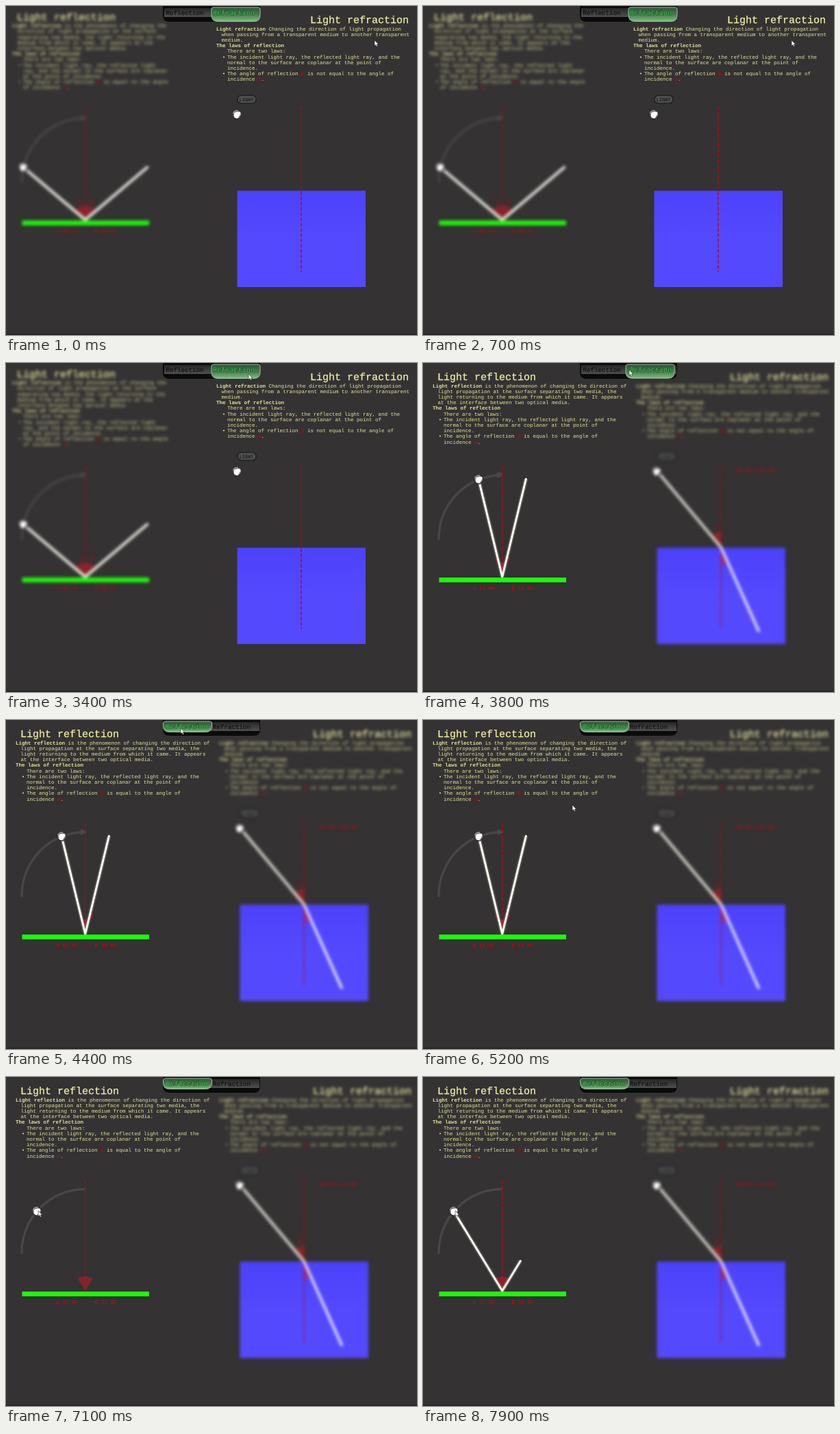
Animation, 600 px wide and 480 px high, one loop 8000 ms. Source, as an HTML page:

```html
<!DOCTYPE html>
<html lang="en">
<head>
<meta charset="utf-8">
<title>Light reflection and refraction</title>
<style>
html, body { margin: 0; width: 100%; height: 100%; overflow: hidden; background: #343233; }
svg { display: block; width: 600px; height: 480px; }
text { font: 7.5px "Liberation Mono", "Courier New", monospace; fill: #e4e49c; white-space: pre; text-rendering: geometricPrecision; }
.title { font-size: 15px; fill: #eeeea2; stroke: #eeeea2; stroke-width: .3; }
.b { font-weight: bold; }
.r { fill: #b00814; font-weight: bold; }
.num { fill: #b80a16; font-weight: bold; }
.beam { fill: none; stroke: #fffff4; stroke-width: 3; stroke-linejoin: round; stroke-linecap: square; }
.halo { fill: none; stroke: #fffff0; stroke-opacity: .16; stroke-width: 6.5; }
.normal { stroke: #b00a18; stroke-width: 1.4; stroke-dasharray: 5.5 2.2; }
.wedge { fill: #d01822; fill-opacity: .5; }
.tab { font-size: 9.2px; fill: #121212; stroke: #121212; stroke-width: .2; }
.tab.on { font-size: 10.2px; font-weight: bold; fill: #3fae50; stroke: #0d3012; stroke-width: .7; paint-order: stroke; }
.blur { filter: blur(2.1px); }
</style>
</head>
<body>
<svg viewBox="0 0 600 480">
  <defs>
    <linearGradient id="green" x2="0" y2="1">
      <stop offset="0" stop-color="#2f5534"/><stop offset=".5" stop-color="#457a4c"/><stop offset="1" stop-color="#7ebd82"/>
    </linearGradient>
    <linearGradient id="grey" x2="0" y2="1">
      <stop offset="0" stop-color="#262626"/><stop offset="1" stop-color="#505050"/>
    </linearGradient>
    <linearGradient id="water" x2="0" y2="1">
      <stop offset="0" stop-color="#4c42fa"/><stop offset=".5" stop-color="#5549fe"/>
    </linearGradient>
    <g id="bulb">
      <circle r="7" fill="#444" stroke="#2a2a2a"/>
      <path d="M-5.5 -1Q-4 -6 2 -5.5" fill="none" stroke="#9a9a9a" stroke-width="1.5"/>
      <path d="M-4 -2Q0 -5 4.5 -3.5Q7 -1 4 1.5Q3 6 0 6Q-6 5 -4 -2Z" fill="#fff"/>
      <path d="M1.5 6L6 0" stroke="#999" stroke-width="1.2"/>
    </g>
  </defs>
  <rect width="600" height="480" fill="#343233"/>
  <rect y="478" width="600" height="2" fill="#2a2529"/>

  <g id="left">
    <g id="wideText"></g>
    <g id="narrowText" transform="translate(-5 -4.3)"></g>
    <path d="M23 258A92.5 92.5 0 0 1 115.5 163.5" fill="none" stroke="#484747" stroke-width="3.4"/>
    <circle id="knob" r="4.2" fill="#484747"/>
    <path id="tip" d="M109 159L118 163.5L109 168Z" fill="#4b4a4a"/>
    <path class="normal" d="M115.8 150V312"/>
    <path id="wedge" class="wedge"/>
    <text id="symA" class="num" x="106" y="288">α</text>
    <text id="symB" class="num" x="123" y="288">β</text>
    <path id="halo" class="halo"/>
    <path id="beam" class="beam"/>
    <rect x="23.5" y="313" width="185.5" height="7" fill="#1cfa0c"/>
    <use id="lamp" href="#bulb"/>
    <text id="numA" class="num" x="73" y="330.5"></text>
    <text id="equal" class="r" x="115" y="330.5">=</text>
    <text id="numB" class="num" x="129.5" y="330.5"></text>
  </g>

  <g id="right">
    <g id="rightText"></g>
    <rect x="338" y="130.5" width="27" height="11.5" rx="5.5" fill="#505050" stroke="#202020" stroke-width="1.5"/>
    <text x="340.5" y="138.6" class="b" style="font-size:7px;fill:#1d1d1d">LIGHT</text>
    <rect x="337.5" y="269.5" width="187.5" height="140.5" fill="url(#water)"/>
    <path class="normal" d="M431 147V388"/>
    <g id="rays">
      <path class="wedge" d="M431 269L417 252Q423 246 431 246ZM431 269L441 293Q436 296 431 296Z"/>
      <text class="num" x="422" y="242">α</text>
      <path class="halo" d="M338 158L431 269L486 391"/>
      <path class="beam" d="M338 158L431 269L486 391" stroke-opacity=".85"/>
      <text class="num" x="453" y="158.5">40.20</text>
      <text class="r" x="479" y="158.5">≠</text>
      <text class="num" x="486" y="158.5">24.30</text>
    </g>
    <use href="#bulb" x="337" y="158"/>
  </g>

  <path d="M229 0H371V14Q371 23 361 23H239Q229 23 229 14Z" fill="#0b0b0b"/>
  <path d="M231 3H370V16H231Z" fill="url(#grey)"/>
  <path id="pill" fill="url(#green)" stroke="#a3bfa3"/>
  <text id="tabA" x="233.5" y="13">Reflection</text>
  <text id="tabB" x="302" y="13">Refraction</text>
  <path id="cursor" d="M0 0V8.2L1.9 6.5L3.2 9.3L4.6 8.6L3.4 5.9H5.8Z" fill="#fff" stroke="#111" stroke-width=".5"/>
</svg>
<script>
const $ = id => document.getElementById(id);
const LOOP = 8000, STEP = 100, SWITCH = 3700;
const HIT = { x: 115.7, y: 312 }, ARC = { x: 115.5, y: 256, r: 93 };
const CHAR = 4.5, LEAD = 8.2;
const clamp = (v, a = 0, b = 1) => Math.min(b, Math.max(a, v));
const mix = (a, b, k) => a + (b - a) * k;

const style = s => s
  .replace(/^(Light refl?r?action|Light reflection|The laws of reflection)/, '<tspan class="b">$1</tspan>')
  .replace(/[αβ]/, '<tspan class="r">$&</tspan>');

// breaks text at the right edge; lines after the first start at x + hang
function wrap(text, x, hang, edge) {
  const rows = [[x, '']];
  for (const word of text.split(' ')) {
    const row = rows[rows.length - 1];
    const next = row[1] ? row[1] + ' ' + word : word;
    if (row[0] + next.length * CHAR > edge) rows.push([x + hang, word]);
    else row[1] = next;
  }
  return rows;
}

function write(id, x, titleX, edge, title, intro, verb) {
  const item = s => wrap(s, x + 16, 0, edge);
  const first = item('The incident light ray, the reflected light ray, and the normal to the surface are coplanar at the point of incidence.');
  const second = item(`The angle of reflection β ${verb} equal to the angle of incidence α.`);
  const rows = [
    ...wrap(`${title} ${intro}`, x, 7.5, edge),
    [x, 'The laws of reflection'], [x + 16, 'There are two laws:'],
    ...first, ...second
  ];
  const put = (px, y, s) => `<text x="${px}" y="${y}">${s}</text>`;
  $(id).innerHTML = `<text class="title" x="${titleX}" y="25">${title}</text>` +
    rows.map((row, i) => {
      const y = 35.5 + i * LEAD, dot = row === first[0] || row === second[0];
      return put(row[0], y, style(row[1])) + (dot ? put(x + 8.7, y, '•') : '');
    }).join('');
}
const reflection = 'is the phenomenon of changing the direction of light propagation at the surface separating two media, the light returning to the medium from which it came. It appears at the interface between two optical media.';
const refraction = 'Changing the direction of light propagation when passing from a transparent medium to another transparent medium.';
write('wideText', 14, 21, 299, 'Light reflection', reflection, 'is');
write('narrowText', 14, 21, 243, 'Light reflection', reflection, 'is');
write('rightText', 307, 444, 595, 'Light refraction', refraction, 'is not');

// time, x, y
const path = [
  [0, 538, 50], [1100, 538, 50], [1700, 509, 30], [2100, 509, 30], [2200, 381, 71],
  [2400, 394, 72], [2600, 394, 72], [3400, 354, 16], [3500, 312, 9], [3800, 301, 10],
  [4200, 258, 10], [4600, 252, 14], [5200, 218, 124], [5400, 180, 162],
  [6300, 47, 195], [LOOP, 47, 195]
];
function pointer(t) {
  const i = path.findIndex(p => p[0] > t), a = path[i - 1], b = path[i];
  const k = (t - a[0]) / (b[0] - a[0]);
  return { x: mix(a[1], b[1], k), y: mix(a[2], b[2], k) };
}

// degrees from the top of the arc, towards the left
function onArc(deg) {
  const a = deg * Math.PI / 180;
  return { x: ARC.x - ARC.r * Math.sin(a), y: ARC.y - ARC.r * Math.cos(a) };
}
const place = (el, p) => el.setAttribute('transform', `translate(${p.x} ${p.y})`);
const show = (el, on) => el.setAttribute('visibility', on ? 'visible' : 'hidden');

function drawLeft(t, mouse) {
  const turn = clamp((t - 6500) / 600);
  const lamp = onArc(t < SWITCH ? 77 : mix(21.7, 49.5, turn));
  const dx = HIT.x - lamp.x, dy = HIT.y - lamp.y, full = Math.hypot(dx, dy);
  const len = t < 6500 ? full * 2 : clamp((t - 7180) * .26, 0, full * 2);
  const k1 = Math.min(len / full, 1), k2 = clamp(len / full - 1);
  const d = `M${lamp.x} ${lamp.y}l${dx * k1} ${dy * k1}` + (k2 ? `l${dx * k2} ${-dy * k2}` : '');
  for (const id of ['beam', 'halo']) {
    $(id).setAttribute('d', d);
    show($(id), len > 0);
  }
  place($('lamp'), lamp);

  const wx = 21 * dx / full, wy = 21 * dy / full;
  $('wedge').setAttribute('d', `M${HIT.x} ${HIT.y}l${-wx} ${-wy}A21 21 0 0 1 ${HIT.x + wx} ${HIT.y - wy}Z`);
  const deg = (Math.atan2(dx, dy) * 180 / Math.PI).toFixed(2);
  $('numA').textContent = 'α ' + deg;
  $('numB').textContent = 'β ' + deg;
  for (const id of ['equal', 'symA', 'symB']) show($(id), t < 6500);

  const aim = Math.atan2(ARC.x - mouse.x, ARC.y - mouse.y) * 180 / Math.PI;
  const rest = aim < 3;
  place($('knob'), onArc(clamp(aim, 3, 90)));
  show($('knob'), t >= SWITCH && t < 7100 && (!rest || t < 4200));
  show($('tip'), rest && (t < SWITCH || t >= 4200));
}

function drawTabs(t) {
  const k = clamp((t - SWITCH) / 700), slide = k * k * (3 - 2 * k);
  const x = mix(300, 229.5, slide), foot = mix(22.5, 17.5, slide) - 9;
  $('pill').setAttribute('d', `M${x} 5q0 -3 3 -3h65q3 0 3 3V${foot}q0 9 -9 9h-53q-9 0 -9 -9Z`);
  const first = t >= 4100;
  $('tabA').setAttribute('class', first ? 'tab on' : 'tab');
  $('tabB').setAttribute('class', first ? 'tab' : 'tab on');
}

function render(now) {
  const t = Math.floor(now % LOOP / STEP) * STEP, left = t >= SWITCH;
  const mouse = pointer(t);
  $('left').classList.toggle('blur', !left);
  $('right').classList.toggle('blur', left);
  show($('wideText'), left);
  show($('narrowText'), !left);
  place($('right'), { x: left ? 4 : 0, y: 0 });
  show($('rays'), left);
  drawLeft(t, mouse);
  drawTabs(t);
  place($('cursor'), mouse);
}

const start = performance.now();
function frame() {
  render(performance.now() - start);
  requestAnimationFrame(frame);
}
frame();
</script>
</body>
</html>
```
